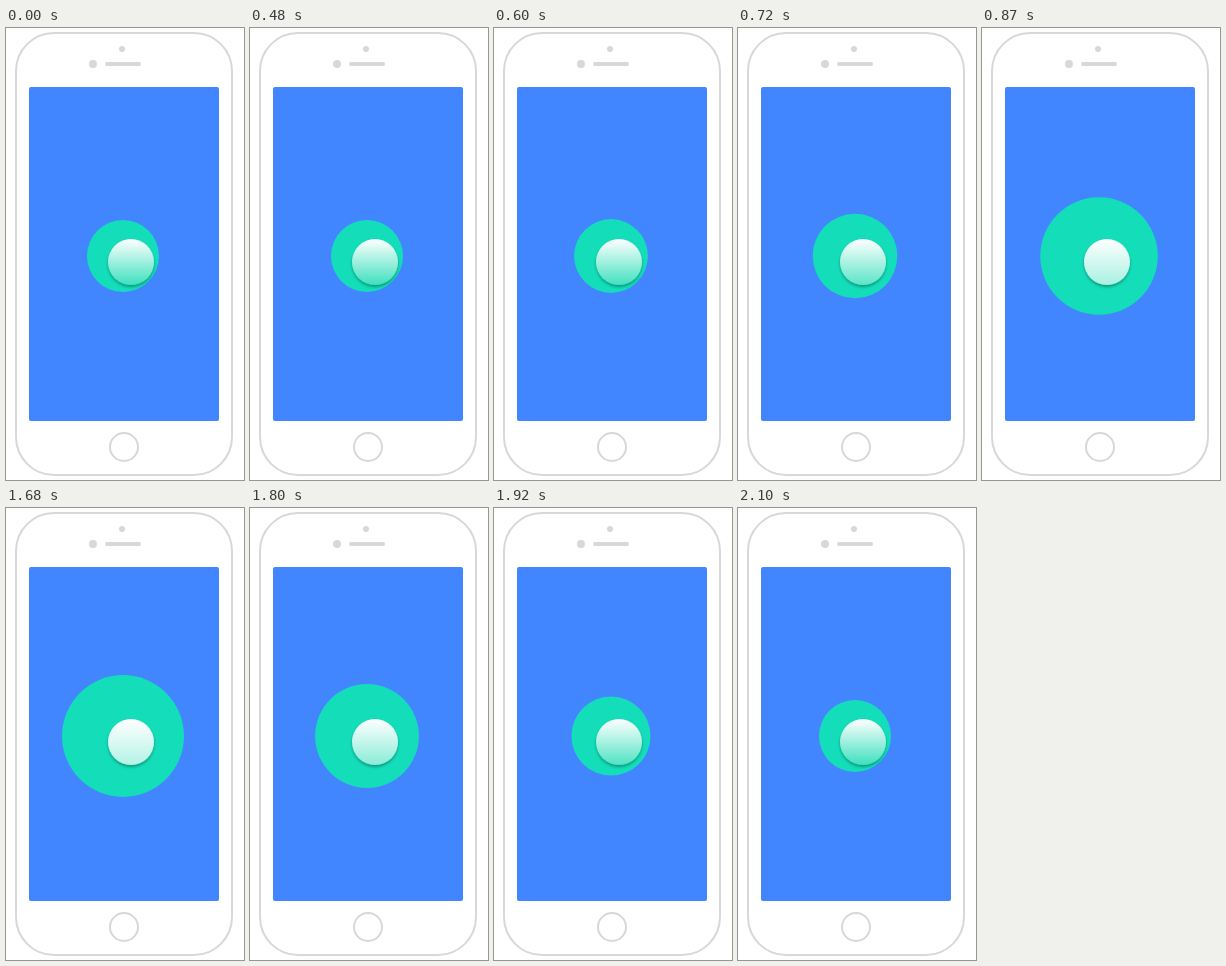
Write an HTML page that moves like this. It is 238 by 452 pixels and loops after 2.37 s.

```html
<!DOCTYPE html>
<html lang="en">
<head>
<meta charset="utf-8">
<title>Pulsing button</title>
<style>
  html, body { margin: 0; width: 100%; height: 100%; overflow: hidden; background: #fff; }
  svg { display: block; width: 238px; height: 452px; }
  .line { fill: #fff; stroke: #d8d8d8; stroke-width: 2; }
  .grey { fill: #d8d8d8; }
</style>
</head>
<body>
<svg viewBox="0 0 238 452">
  <defs>
    <linearGradient id="shade" x1="0" y1="0" x2="0" y2="1">
      <stop offset="0" stop-color="#fff"/>
      <stop offset="1" id="tint"/>
    </linearGradient>
    <filter id="shadow" x="-30%" y="-30%" width="160%" height="160%">
      <feDropShadow dx="0" dy="2" stdDeviation="1.6" flood-color="#000" flood-opacity=".32"/>
    </filter>
  </defs>
  <rect class="line" x="10" y="5" width="216" height="442" rx="38"/>
  <circle class="grey" cx="116" cy="21" r="3"/>
  <circle class="grey" cx="87" cy="36" r="4"/>
  <rect class="grey" x="99" y="34" width="36" height="4" rx="2"/>
  <rect x="23" y="59" width="190" height="334" rx="2" fill="#4286ff"/>
  <circle class="line" cx="118" cy="419" r="14"/>
  <circle id="disc" cx="117" cy="228" fill="#13deb9"/>
  <circle cx="125" cy="234" r="23" fill="url(#shade)" filter="url(#shadow)"/>
</svg>
<script>
const LOOP = 2370, STEP = 30;
const disc = document.getElementById('disc');
const tint = document.getElementById('tint');

const mix = (a, b, p) => a + (b - a) * p;

// Cubic Bézier easing with control points (x1, 0) and (x2, 1)
function ease(x, x1, x2) {
  if (x <= 0) return 0;
  if (x >= 1) return 1;
  let lo = 0, hi = 1;
  for (let i = 0; i < 24; i++) {
    const s = (lo + hi) / 2, q = 1 - s;
    if (3 * q * q * s * x1 + 3 * q * s * s * x2 + s ** 3 < x) lo = s;
    else hi = s;
  }
  return lo * lo * (3 - 2 * lo);
}

function draw(now) {
  const t = Math.floor(now % LOOP / STEP) * STEP;
  const open = t < 1680;
  const p = open ? ease((t - 480) / 570, .75, .25)
                 : 1 - ease((t - 1672) / 428, .4, .2);
  disc.setAttribute('r', mix(36, open ? 61.3 : 61, p));
  tint.setAttribute('stop-color',
    `rgb(${mix(62, 180, p)}, ${mix(224, 243, p)}, ${mix(190, 229, p)})`);
}

const start = performance.now();
function frame() {
  draw(performance.now() - start);
  requestAnimationFrame(frame);
}
frame();
</script>
</body>
</html>
```
